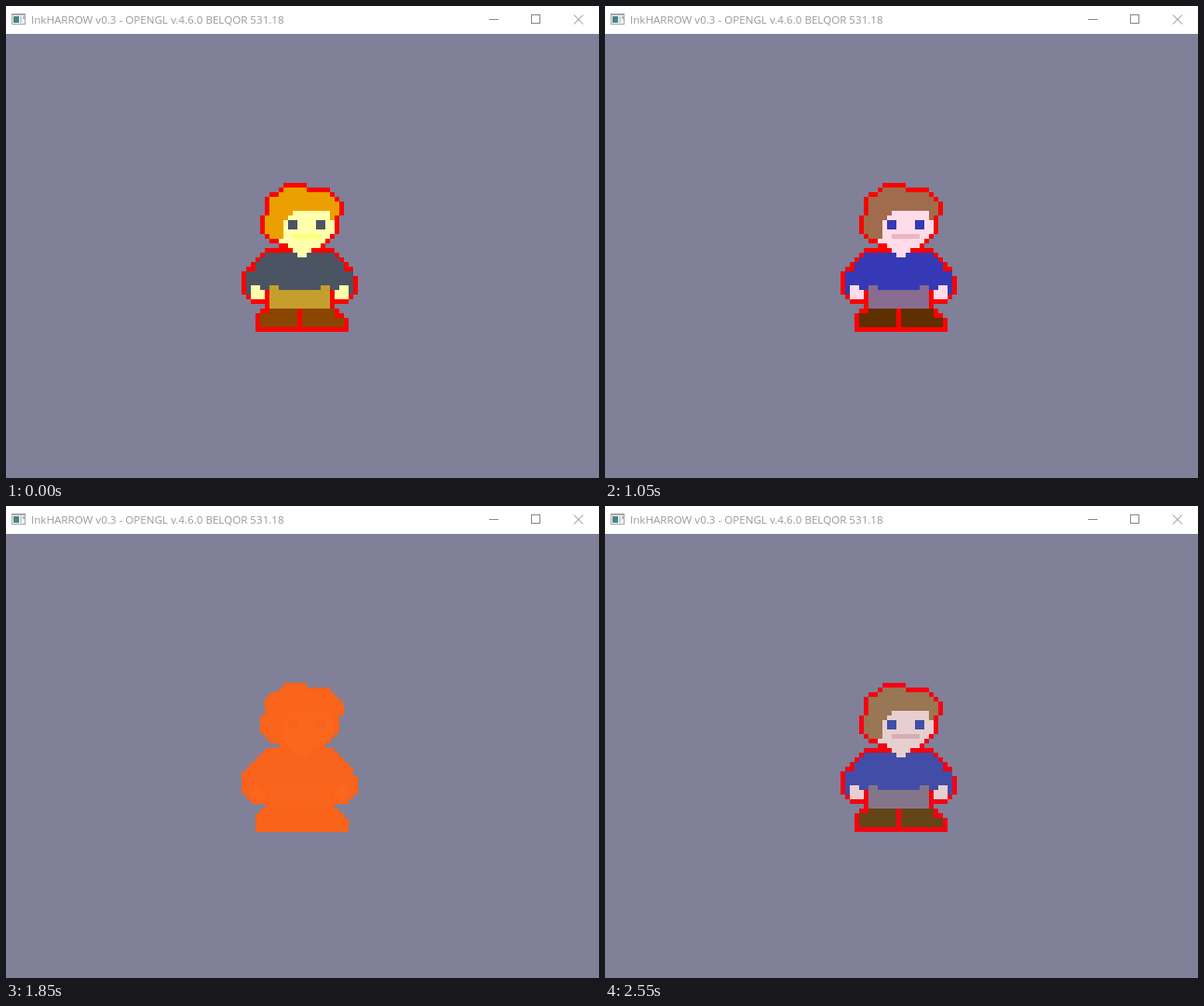
Write an HTML page that moves like this. It is 637 px wide and 507 px high and loops after 2650 ms.

```html
<!DOCTYPE html>
<html lang="en">
<head>
<meta charset="utf-8">
<title>Sprite tint</title>
<style>
  html, body { margin: 0; width: 100%; height: 100%; overflow: hidden; background: #808099; }
  svg { display: block; width: 637px; height: 507px; }
  text { font: 11.6px "Open Sans", "Noto Sans", sans-serif; fill: #999; }
</style>
</head>
<body>
<svg viewBox="0 0 637 507">
  <rect width="637" height="507" fill="#808099"/>
  <rect width="637" height="30" fill="#fff"/>

  <g shape-rendering="crispEdges">
    <rect x="6" y="8" width="15" height="12" fill="#a4a8ac"/>
    <rect x="7" y="10" width="13" height="9" fill="#f2f4f4"/>
    <rect x="8" y="11" width="6" height="7" fill="#4c8484"/>
    <rect x="15" y="11" width="2" height="7" fill="#c4d4d4"/>
    <rect x="18" y="11" width="2" height="3" fill="#a8bcbc"/>
  </g>
  <text x="27" y="19">InkHARROW v0.3 - OPENGL v.4.6.0 BELQOR 531.18</text>

  <g fill="none" stroke="#888">
    <path d="M 519 14.5 h 10 M 564.5 9.5 h 9 v 9 h -9 z" shape-rendering="crispEdges"/>
    <path d="M 610 9.5 l 10 10 M 620 9.5 l -10 10"/>
  </g>

  <g id="sprite" transform="translate(253 190) scale(5)" shape-rendering="crispEdges"></g>
</svg>

<script>
const LOOP = 2650;
const STEPS = [
  0, 60, 140, 210, 290, 360, 460, 560,
  660, 720, 830, 900, 970, 1040, 1100, 1170,
  1220, 1250, 1340, 1410, 1470, 1540, 1600, 1690,
  1750, 1860, 1970, 2080, 2200, 2260,
  2320, 2400, 2480, 2550
];

const RED = [255, 0, 0];
const HAIR = [154, 127, 73];
const SHIRT = [60, 83, 163];
const SKIN = [240, 224, 206];
const BELT = [131, 127, 131];
const SHOES = [97, 74, 6];
const MOUTH = [217, 190, 176];

const sprite = document.getElementById("sprite");

// Mix towards a cycling rainbow tint; a negative amount pushes away from it.
function tinted(base, t) {
  const phase = 0.00213 * t - 3.94;
  const amount = Math.cos(phase);
  const rgb = base.map((c, i) => {
    const tint = 127.5 * (1 + Math.cos(phase + 2 * i));
    const v = c + (tint - c) * amount;
    return Math.round(Math.min(255, Math.max(0, v)));
  });
  return `rgb(${rgb})`;
}

function box(color, x, y, width, height) {
  const rect = document.createElementNS(sprite.namespaceURI, "rect");
  for (const [key, value] of Object.entries({ x, y, width, height })) {
    rect.setAttribute(key, value);
  }
  sprite.append(rect);

  const frames = STEPS.map(t => ({
    offset: t / LOOP, fill: tinted(color, t), easing: "step-end"
  }));
  frames.push({ ...frames.at(-1), offset: 1 });
  rect.animate(frames, { duration: LOOP, iterations: Infinity });
}

// Stack of bands from row y down, each [left, right, height = 1].
function stack(color, y, ...bands) {
  for (const [left, right, height = 1] of bands) {
    box(color, left, y, right - left, height);
    y += height;
  }
}

// Outline: head, body, legs
stack(RED, 0, [9, 14], [8, 19], [6, 20], [5, 21], [5, 22, 3],
  [4, 21, 4], [5, 20], [6, 19], [8, 18]);
stack(RED, 14, [5, 20], [4, 21], [3, 22], [2, 23], [1, 24], [0, 24],
  [0, 25, 4], [1, 24], [2, 23]);
stack(RED, 26, [5, 20], [4, 21], [3, 22], [3, 23, 3]);

// Head
stack(HAIR, 1, [9, 14], [8, 19], [6, 20], [6, 21, 3], [5, 20], [5, 9, 3], [6, 9]);
stack(SKIN, 6, [11, 19], [10, 19], [9, 20, 3], [9, 19], [8, 18], [10, 17], [11, 15]);
for (const x of [10, 16]) box(SHIRT, x, 8, 2, 2);
box(MOUTH, 11, 11, 6, 1);

// Body and arms
stack(SHIRT, 15, [5, 20], [4, 21], [3, 22, 2], [1, 24, 4]);
for (const x of [1, 23]) box(SHIRT, x, 23, 1, 1);
box(SKIN, 12, 15, 2, 1);
stack(SKIN, 22, [2, 4], [2, 5, 2]);
stack(SKIN, 22, [21, 23], [20, 23, 2]);

// Belt and shoes
for (const x of [6, 17]) box(BELT, x, 22, 2, 1);
box(BELT, 6, 23, 13, 4);
stack(SHOES, 27, [6, 12], [4, 12, 3]);
stack(SHOES, 27, [13, 20, 2], [13, 22, 2]);
</script>
</body>
</html>
```
